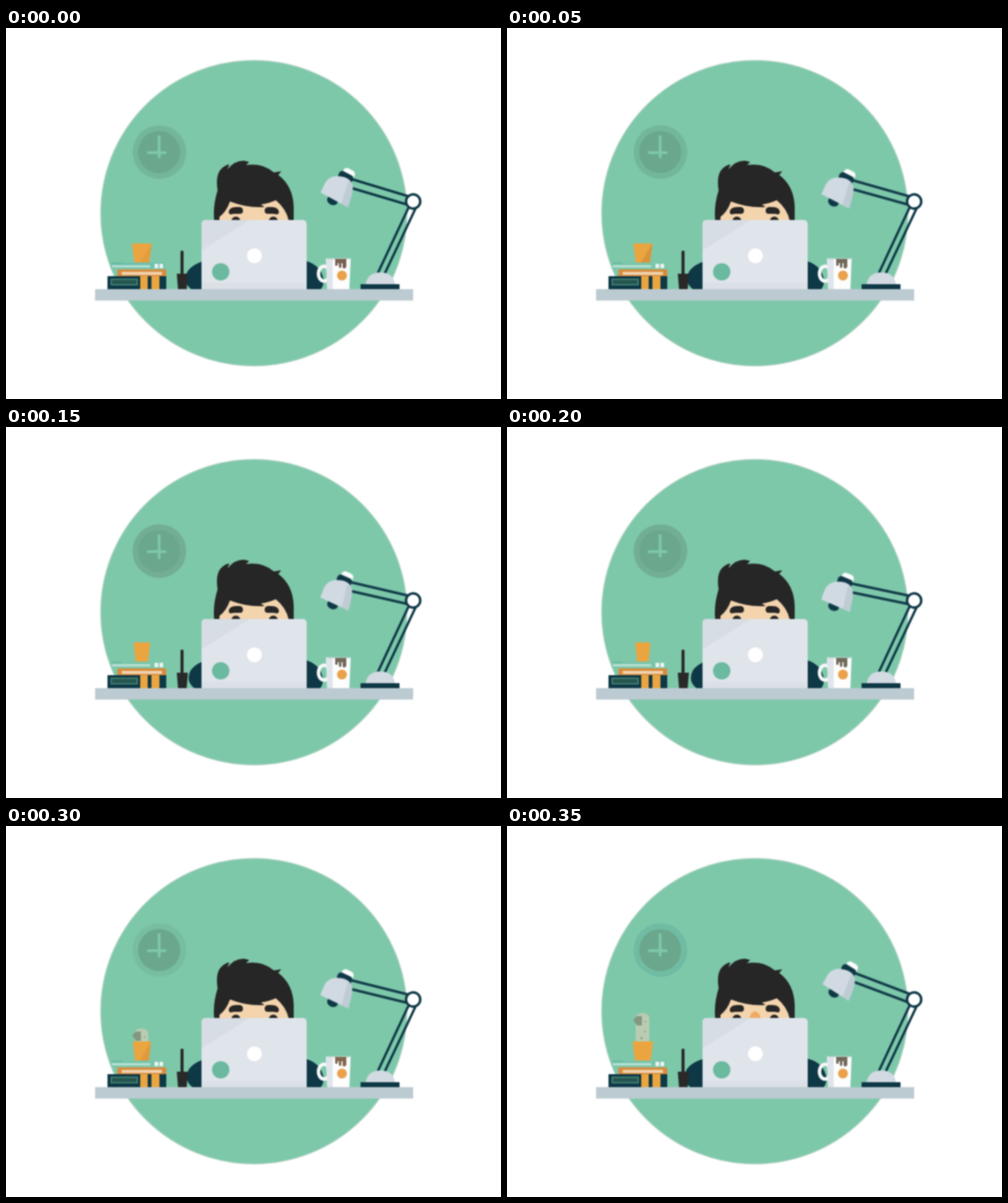
These frames come from a looping animation (800 by 601 pixels, 0.4 s). An HTML page without scripts:

```html
<!DOCTYPE html>
<html lang="en">
<head>
<meta charset="utf-8">
<title>Desk</title>
<style>
html, body { margin: 0; width: 100%; height: 100%; overflow: hidden; background: #fff; }
svg { display: block; width: 100%; height: 100%; filter: blur(1px); }
.dark { fill: #0e3846; }
.hair { fill: #262626; }
.orange { fill: #eba540; }
.wire { fill: none; stroke: #0e3846; stroke-width: 4; }

/* Every part shares one stepped 400 ms loop. */
.move { animation: .4s step-end infinite; }
.lamp { transform-origin: 658px 281px; animation-name: lamp; }
.pot { transform-origin: 219.5px 0; animation-name: pot; }
.shade { animation-name: shade; }
.cactus { animation-name: grow; }
.left { animation-name: left; }
.right { animation-name: right; }
.nose { animation-name: nose; }
.ring { animation-name: ring; }
.hand { animation-name: hand; }
.cover { animation-name: cover; }
.coffee { animation-name: coffee; }

@keyframes lamp {
  0% { transform: rotate(0deg); }
  12.5% { transform: rotate(-1deg); }
  25% { transform: rotate(-2.2deg); }
  37.5% { transform: rotate(-3.7deg); }
  50% { transform: rotate(-4.9deg); }
  62.5% { transform: rotate(-5.3deg); }
  75% { transform: rotate(-2.8deg); }
  87.5%, 100% { transform: rotate(4deg); }
}
@keyframes pot {
  0% { transform: scaleX(1); }
  12.5% { transform: scaleX(.96); }
  25% { transform: scaleX(.92); }
  37.5% { transform: scaleX(.84); }
  50%, 62.5% { transform: scaleX(.77); }
  75% { transform: scaleX(.92); }
  87.5%, 100% { transform: scaleX(1.05); }
}
@keyframes shade {
  0% { opacity: .4; }
  12.5%, 25% { opacity: 1; }
  37.5%, 50% { opacity: 0; }
  62.5%, 75% { opacity: .6; }
  87.5%, 100% { opacity: 0; }
}
@keyframes grow {
  0% { transform: translateY(50px); }
  75% { transform: translateY(25px); }
  87.5%, 100% { transform: none; }
}
@keyframes left {
  0% { transform: none; }
  12.5% { transform: translateX(1px); }
  25% { transform: translateX(2px); }
  37.5% { transform: translateX(5px); }
  50% { transform: translateX(7px); }
  62.5% { transform: translateX(6px); }
  75% { transform: translateX(2px); }
  87.5%, 100% { transform: translateX(-3px); }
}
@keyframes right {
  0% { transform: none; }
  12.5%, 25%, 37.5%, 50%, 62.5% { transform: translateX(-1px); }
  75% { transform: none; }
  87.5%, 100% { transform: translateX(3px); }
}
@keyframes nose {
  0% { opacity: 0; }
  87.5%, 100% { opacity: 1; }
}
@keyframes ring {
  0% { fill: #74b798; }
  12.5%, 25% { fill: #72b799; }
  37.5%, 50% { fill: #72af92; }
  62.5% { fill: #72b799; }
  75% { fill: #76be9f; }
  87.5%, 100% { fill: #70bca3; }
}
@keyframes hand {
  0% { transform: none; }
  25% { transform: translateY(3px); }
  50% { transform: none; }
  62.5%, 75% { transform: translateY(2px); }
  87.5%, 100% { transform: none; }
}
@keyframes cover {
  0% { opacity: 1; }
  12.5%, 25%, 37.5%, 50% { opacity: .2; }
  62.5% { opacity: .8; }
  75%, 87.5%, 100% { opacity: .3; }
}
@keyframes coffee {
  0% { fill: #796152; }
  12.5%, 25%, 37.5%, 50%, 62.5% { fill: #70695a; }
  75% { fill: #80674f; }
  87.5%, 100% { fill: #70695a; }
}
</style>
</head>
<body>
<svg viewBox="0 0 800 601" preserveAspectRatio="none">
  <defs>
    <clipPath id="soil"><rect x="195" y="295" width="50" height="54"/></clipPath>
    <clipPath id="dome"><path id="bell" d="M510 265L518 248Q526 236 543 239Q559 241 562 255Q562 266 554 289Z"/></clipPath>
  </defs>

  <circle cx="400.5" cy="300" r="247.500" fill="#7ec8aa" stroke="#b4d3c6" stroke-width="1.500"/>

  <!-- Clock -->
  <circle class="move ring" cx="248" cy="201" r="43.500" fill="#74b798"/>
  <circle cx="247.500" cy="201" r="34" fill="#6aa78c"/>
  <g fill="none" stroke="#7ec8aa" stroke-width="4.500">
    <path d="M228 202H259"/>
    <path d="M247.500 174V200"/>
    <path class="move hand" d="M247.500 196V211"/>
  </g>

  <!-- Head -->
  <path d="M344 313Q346 290 362 275H436Q452 290 457 313Z" fill="#f3d4ad"/>
  <path class="hair" d="M336.500 312Q334 288 342 263Q338 238 348 228Q354 222 361 221L358 229Q370 214 385 215L393 217L388 222Q415 218 433 234L445 232L440 238Q464 256 465 290V312H457Q453 293 436 279Q425 284 412 286L418 290Q390 292 362 281Q356 298 345 306V312Z"/>
  <g class="hair">
    <path id="brow" d="M360 298Q361 290 372 290H378Q383 291 383 296Q383 301 378 301H370Q366 301 364 302Q360 302 360 298Z"/>
    <use href="#brow" transform="matrix(-1 0 0 1 801 0)"/>
    <ellipse cx="371.500" cy="312" rx="7" ry="6.500"/>
    <ellipse cx="432" cy="312" rx="7" ry="6.500"/>
  </g>
  <path class="move nose" d="M392 312Q394 301 401 300Q408 301 410 312Z" fill="#f0ab62"/>

  <!-- Arms -->
  <path class="move left dark" d="M326 376Q302 381 293 395Q285 412 299 423H326Z"/>
  <path class="move right dark" d="M478 376Q498 379 508 393Q518 411 509 423H478Z"/>

  <!-- Laptop -->
  <path d="M316 423V318Q316 311 323 311H479Q486 311 486 318V423Z" fill="#e0e4eb"/>
  <path d="M316 360V318Q316 311 323 311H394Z" fill="#d7dde5"/>
  <path d="M316 413H486V423H316Z" fill="#dae0e6"/>
  <circle cx="401.500" cy="369" r="12" fill="#fff"/>
  <circle cx="347" cy="395" r="14" fill="#6bb99f"/>

  <!-- Books -->
  <path class="dark" d="M164 402H259V423H164Z"/>
  <path d="M170 407H212V416H170Z" fill="#24564f" stroke="#468478" stroke-width="2"/>
  <path class="orange" d="M217 402H229V423H217ZM235 402H248V423H235Z"/>
  <path d="M180 391H259V402H180Z" fill="#d88b3d"/>
  <path d="M187 395H252V400H187Z" fill="#f0d1ac"/>
  <path class="move cover" d="M169 380H257V389H169Z" fill="#6dc1ae"/>
  <path d="M171 381H187" stroke="#65b89c" stroke-width="2"/>
  <path d="M171 386H233" stroke="#c4e5dc" stroke-width="3"/>
  <path d="M240 382H246V389H240ZM248 382H254V389H248Z" fill="#edf4f2"/>

  <!-- Cactus -->
  <g clip-path="url(#soil)">
    <g class="move cactus">
      <path d="M208 402V313Q208 303 219 303Q230 303 230 313V402Z" fill="#b9ccb2"/>
      <path d="M204 314L210 308H218V323H210Z" fill="#829680"/>
      <path d="M216 342h3v3h-3zM222 332h2v2h-2zM223 316h2v2h-2z" fill="#87977f"/>
    </g>
  </g>
  <g class="move pot">
    <path class="orange" d="M203.500 349H235.500L231.500 380H207.500Z"/>
    <path class="move shade" d="M235.500 349L231.500 380H216Z" fill="#d9933a"/>
  </g>

  <!-- Pen cup -->
  <path d="M276 398H294L292 423H278Z" fill="#292929"/>
  <path d="M284.500 363V400" stroke="#292929" stroke-width="5" stroke-linecap="round"/>

  <!-- Mug -->
  <ellipse cx="514" cy="398" rx="9" ry="12" fill="none" stroke="#f7f9fa" stroke-width="5.500"/>
  <path d="M517 373H557L555 423H519Z" fill="#fdfdfd"/>
  <path d="M517 373H528V423H519Z" fill="#dfe5eb"/>
  <path d="M519 374H556" stroke="#c9d9d3" stroke-width="2"/>
  <path class="move coffee" d="M532 374H550V387Q547 392 544 388V381H542V387Q540 391 538 387V381H536V385H532Z" fill="#796152"/>
  <circle cx="543" cy="401" r="8" fill="#e9a14c"/>

  <!-- Lamp -->
  <path class="wire" d="M601 397L651 290M612 398L663 290"/>
  <path d="M581 416Q584 396 605 396Q626 396 629 416Z" fill="#d2dae2"/>
  <path class="dark" d="M573 415H636V423H573Z"/>
  <g class="move lamp">
    <path class="wire" d="M556 244L650 272.500M556 258.500L650 286.500"/>
    <g transform="translate(-1.500 1.500)">
      <ellipse class="dark" cx="529" cy="278" rx="9" ry="7" transform="rotate(28 529 278)"/>
      <rect x="545" y="227" width="20" height="17" rx="6" fill="#fbfcfc" transform="rotate(28 555 235)"/>
      <rect class="dark" x="538" y="233" width="25" height="13" rx="5" transform="rotate(28 550 240)"/>
      <use href="#bell" fill="#d1dae2"/>
      <path d="M565 238L554 249L541 292H570Z" fill="#bfccd4" clip-path="url(#dome)"/>
    </g>
  </g>
  <circle cx="658" cy="281" r="11.500" fill="#fff" stroke="#0e3846" stroke-width="4"/>

  <path d="M144 423H658V441.500H144Z" fill="#bccad1"/>
</svg>
</body>
</html>
```
